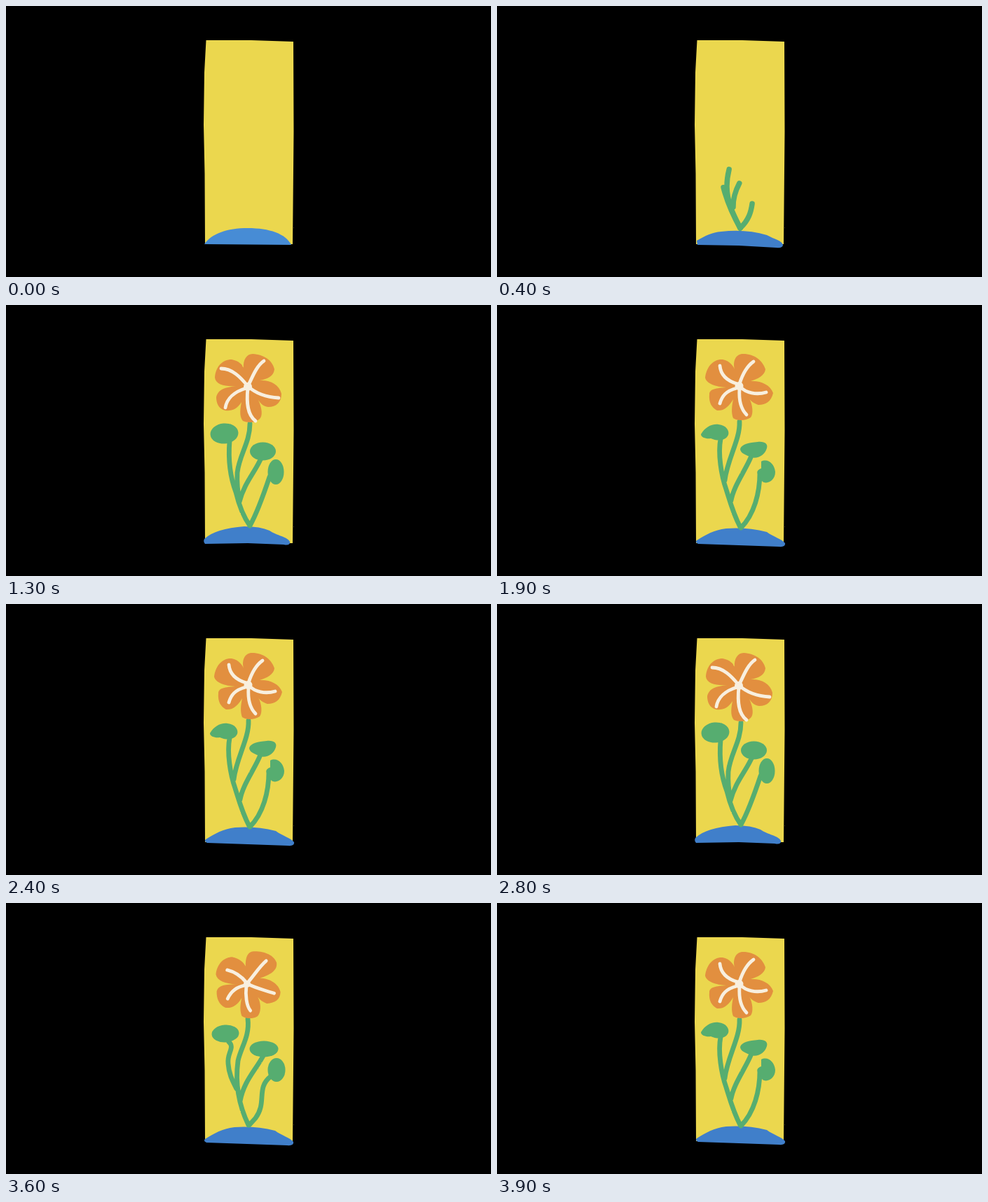
Animation, 692 px wide and 388 px high, one loop 4 s. Source, as an HTML page without scripts:

```html
<!DOCTYPE html>
<html lang="en">
<head>
<meta charset="utf-8">
<title>Growing flower</title>
<style>
html, body { margin: 0; width: 100%; height: 100%; overflow: hidden; background: #000; }
svg { display: block; width: 100vw; height: 100vh; }

.hill { fill: #407fca; }
.leaf { fill: #56ad70; }
.stem { fill: none; stroke: #56ad70; stroke-width: 6.8; stroke-linecap: round; stroke-linejoin: round; }
.petal { fill: #e28f3f; }
.vein { fill: none; stroke: #f8efdf; stroke-width: 4.8; stroke-linecap: round; }
.eye { fill: #f8efdf; }

/* one tick = 100 ms = 2.5% */
.pose, .grow * { animation: 4s step-end infinite; }
.pose { opacity: 0; }
.seed { animation-name: seed; }
.grow { animation-name: grow; }
.a { animation-name: a; }
.b { animation-name: b; }
.c { animation-name: c; }
.d { animation-name: d; }
.e { animation-name: e; }

@keyframes seed { 0% { opacity: 1 } 2.5%, 100% { opacity: 0 } }
@keyframes grow { 0%, 32.5%, 100% { opacity: 0 } 2.5% { opacity: 1 } }
@keyframes a {
  0%, 35%, 47.5%, 60%, 72.5%, 85%, 97.5%, 100% { opacity: 0 }
  32.5%, 45%, 57.5%, 70%, 82.5%, 95% { opacity: 1 }
}
@keyframes b {
  0%, 37.5%, 52.5%, 62.5%, 75%, 87.5%, 100% { opacity: 0 }
  35%, 47.5%, 60%, 72.5%, 85%, 97.5% { opacity: 1 }
}
@keyframes c {
  0%, 40%, 65%, 77.5%, 90%, 100% { opacity: 0 }
  37.5%, 62.5%, 75%, 87.5% { opacity: 1 }
}
@keyframes d {
  0%, 42.5%, 55%, 67.5%, 80%, 92.5%, 100% { opacity: 0 }
  40%, 52.5%, 65%, 77.5%, 90% { opacity: 1 }
}
@keyframes e {
  0%, 45%, 57.5%, 70%, 82.5%, 95%, 100% { opacity: 0 }
  42.5%, 55%, 67.5%, 80%, 92.5% { opacity: 1 }
}

.grow .stem { stroke-dasharray: 1 2; stroke-width: 7.5; animation-name: sprout; }
.grow .leaf { transform-box: fill-box; transform-origin: center; animation-name: unfold; }
.bud .vein { stroke-width: 3.5; }
.grow .bud { transform-origin: 344px 118px; animation-name: bud; }
.grow .bloom { transform-origin: 346px 116px; animation-name: bloom; }
@keyframes sprout {
  0% { stroke-dashoffset: .85 }
  7.5% { stroke-dashoffset: .68 }
  10% { stroke-dashoffset: .5 }
  12.5% { stroke-dashoffset: .32 }
  15% { stroke-dashoffset: .14 }
  17.5%, 100% { stroke-dashoffset: 0 }
}
@keyframes unfold {
  0% { transform: scale(0) }
  15% { transform: scale(.4) }
  17.5% { transform: scale(.75) }
  20%, 100% { transform: scale(1) }
}
@keyframes bud {
  0%, 22.5%, 100% { transform: scale(0) }
  17.5% { transform: scale(.5) }
  20% { transform: scale(1) }
}
@keyframes bloom {
  0% { transform: scale(0) }
  22.5% { transform: scale(.74) }
  27.5% { transform: scale(.87) }
  30%, 100% { transform: scale(.96) }
}
</style>
</head>
<body>
<svg viewBox="0 0 692 388" preserveAspectRatio="none">
  <defs>
    <filter id="chalk" filterUnits="userSpaceOnUse" x="260" y="30" width="180" height="340" color-interpolation-filters="sRGB">
      <feTurbulence type="fractalNoise" baseFrequency=".3" numOctaves="2" seed="4" result="noise"/>
      <feGaussianBlur in="SourceGraphic" stdDeviation=".45"/>
      <feDisplacementMap in2="noise" scale="1.4" xChannelSelector="R" yChannelSelector="G"/>
    </filter>

    <g id="flowerB">
      <path class="petal" d="M339 92C336 80 341 70 351 70C368 70 379 80 383 92C382 101 372 106 362 109C376 108 390 114 394 126C391 138 384 143 373 143C367 141 362 138 360 134C365 143 366 156 362 161C354 166 343 166 337 162C334 154 335 145 337 135C331 145 324 152 314 151C306 147 302 139 303 128C303 120 313 119 327 118C312 117 299 113 297 104C299 88 309 77 322 78C332 80 337 87 339 92Z"/>
      <path class="vein" d="M346 113C350 100 356 88 366 81M343 113C326 108 319 98 318 87M347 117C355 126 370 129 384 125M346 120C345 135 347 148 356 157M342 119C327 123 321 130 318 141"/>
      <circle class="eye" cx="345.5" cy="116" r="6"/>
    </g>

    <g id="flowerE">
      <path class="petal" d="M341 91C340 79 343 69 352 69C366 68 381 73 385 84C387 96 375 102 362 107C376 107 389 114 392 126C392 137 385 142 373 143C367 141 363 138 360 134C366 145 365 158 360 162C353 166 344 166 338 162C335 154 335 147 337 136C332 146 324 152 314 151C305 147 301 138 301 128C303 119 314 118 328 117C313 117 301 113 299 104C300 88 310 79 321 78C332 80 338 85 341 91Z"/>
      <path class="vein" d="M344 115C353 104 361 90 370 82M343 114C335 105 325 99 315 97M345 116C357 122 370 124 383 128M343 118C342 132 344 147 350 154M341 118C328 121 321 128 317 138"/>
      <circle class="eye" cx="344" cy="116" r="5"/>
    </g>

    <g id="plantE">
      <path class="stem" d="M346 166C349 191 336 207 332 226C328 256 331 285 347 318M319 199C328 207 316 215 318 230C319 245 324 254 330 266M369 217C357 240 340 255 335 284M379 248C357 265 374 285 357 308L348 318"/>
      <ellipse class="leaf" cx="314" cy="187" rx="19.5" ry="12.5" transform="rotate(-4 314 187)"/>
      <ellipse class="leaf" cx="369" cy="209" rx="20.5" ry="11.5"/>
      <ellipse class="leaf" cx="387" cy="239" rx="12.5" ry="17"/>
    </g>

    <g id="plantB">
      <path class="stem" d="M346 167C347 193 329 219 325 251M319 192C315 213 320 244 327 264C332 280 337 299 347 318M363 216C354 238 338 258 334 280M375 240C375 269 367 300 348 319"/>
      <path class="leaf" d="M291 185C297 175 306 170 316 171C327 172 332 180 330 186C326 195 314 195 305 191C299 192 291 190 291 185Z"/>
      <path class="leaf" d="M347 206C349 199 360 197 372 196C382 195 387 199 385 205C382 215 372 221 362 218C354 214 347 212 347 206Z"/>
      <path class="leaf" d="M377 224C386 219 396 227 397 239C397 250 388 256 381 254C376 252 378 248 375 246C369 240 371 236 377 234Z"/>
    </g>

    <g id="plantA">
      <path class="stem" d="M348 170C348 197 333 214 330 240Q329 260 333 280M319 195C317 220 319 244 328 268C332 285 338 302 348 316M365 217C356 239 340 254 333 282M376 246C367 273 357 300 348 316"/>
      <ellipse class="leaf" cx="311.5" cy="184" rx="20" ry="14.5" transform="rotate(-5 311.5 184)"/>
      <ellipse class="leaf" cx="366.5" cy="209.5" rx="18.5" ry="13"/>
      <ellipse class="leaf" cx="385" cy="239" rx="11.5" ry="18"/>
    </g>

    <path id="hillB" class="hill" d="M285 337C298 329 309 322 327 320Q357 318 385 325C394 332 407 335 411 341Q412 347 402 346L345 344L287 342Q282 340 285 337Z"/>
    <path id="hillE" class="hill" d="M280 337C292 330 312 321 340 319Q363 320 379 327C391 334 407 337 409 343Q410 349 398 347L345 345L287 345Q283 341 280 337Z"/>
  </defs>

  <rect width="692" height="388"/>
  <g filter="url(#chalk)">
    <path fill="#ebd74e" d="M285.5 49L350 49L410 51L410.5 180L409 341L284 341L283.5 240L282 170L283 95Z"/>

    <g class="pose seed">
      <path fill="#478cd5" d="M283 341C293 326 315 318 345 318C376 318 399 326 407 342Z"/>
    </g>

    <g class="pose grow">
      <path class="hill" d="M285 336C297 329 307 324 320 323Q355 319 385 328C396 334 407 336 408 342Q408 347 398 346L345 343L286 342Z"/>
      <path class="stem" pathLength="1" d="M347 318C337 298 328 281 328 258C328 221 351 199 347 148"/>
      <path class="stem" pathLength="1" d="M347 318C337 300 331 287 325 267C317 240 320 221 319 197"/>
      <path class="stem" pathLength="1" d="M337 288C336 261 353 246 362 222"/>
      <path class="stem" pathLength="1" d="M347 318C374 293 357 265 376 246"/>
      <path class="leaf" d="M293 189C294 177 308 172 323 173C332 174 334 180 331 187C326 198 316 200 305 198C296 198 292 194 293 189Z"/>
      <path class="leaf" d="M351 206C353 196 368 198 378 197C387 199 390 207 389 214C386 226 371 223 360 221C351 218 349 212 351 206Z"/>
      <path class="leaf" d="M375 230C381 222 393 220 398 231C402 243 398 253 389 257C378 256 373 249 375 230Z"/>
      <g class="bud">
        <path class="petal" d="M343 104L345 90L350 88L363 93L367 100L358 110L356 117L372 121L371 132L362 137L351 130L356 138L350 145L338 147L337 131L329 136L318 136L317 131L330 120L316 109L322 102L323 97L329 101L335 94L341 99Z"/>
        <path class="vein" d="M343 117Q345 107 350 102M342 117Q338 109 330 110M344 117Q349 117 355 121M342 119Q342 125 344 130M341 118Q335 122 332 129"/>
      </g>
      <g class="bloom"><use href="#flowerB"/></g>
    </g>

    <g class="pose a">
      <path class="hill" d="M283 335C293 325 313 319 340 317Q363 317 376 323C386 330 402 332 405 339Q406 345 396 343L345 341L284 342Q281 339 283 335Z"/>
      <use href="#plantA"/>
      <path class="petal" d="M339 90C338 79 343 70 352 70C368 71 380 79 383 92C382 102 373 106 362 108C377 107 390 114 393 127C393 139 386 146 374 146C367 145 363 141 360 136C366 149 366 159 362 163C356 169 345 169 338 166C334 161 333 154 336 139C330 149 322 152 313 151C303 149 300 140 300 132C303 120 313 118 328 116C313 117 299 114 298 104C299 88 309 78 322 78C332 80 337 85 339 90Z"/>
      <path class="vein" d="M345 116C350 108 356 88 368 80M344 115C335 104 323 91 307 91M346 117C357 127 372 132 389 133M345 119C343 139 344 157 356 166M343 119C326 124 315 134 313 147"/>
      <circle class="eye" cx="345" cy="117" r="6"/>
    </g>

    <g class="pose b">
      <use href="#hillB"/>
      <use href="#plantB"/>
      <use href="#flowerB"/>
    </g>

    <g class="pose c">
      <use href="#hillE" y="2"/>
      <use href="#plantA" x="1" y="1"/>
      <use href="#flowerB" transform="rotate(-2 346 116)"/>
    </g>

    <g class="pose d">
      <use href="#hillB" x="-1" y="1"/>
      <use href="#plantE" x="-1"/>
      <use href="#flowerE" transform="rotate(2 346 116)"/>
    </g>

    <g class="pose e">
      <use href="#hillE"/>
      <use href="#plantE"/>
      <use href="#flowerE"/>
    </g>
  </g>
</svg>
</body>
</html>
```
